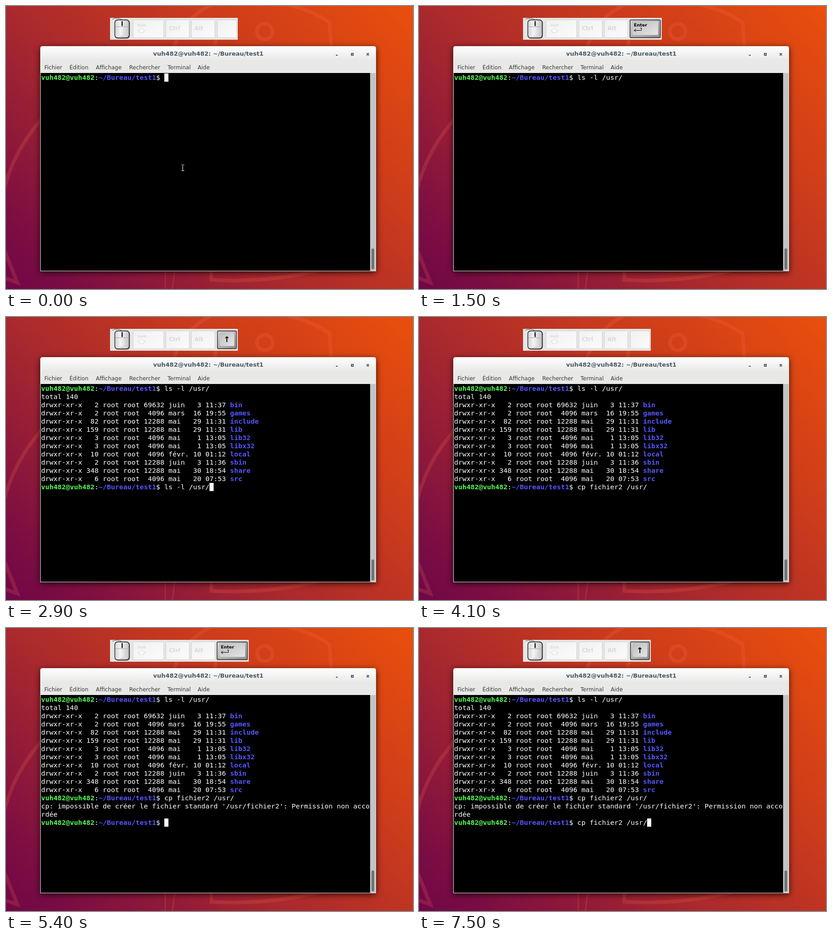
An HTML page that plays this animation: 892x621 px, repeating every 8 s.

```html
<!DOCTYPE html>
<html lang="fr">
<head>
<meta charset="utf-8">
<title>Terminal</title>
<style>
  html, body { margin: 0; width: 100%; height: 100%; overflow: hidden; background: #b5302a; }
  svg { display: block; width: 892px; height: 621px; }
  text { white-space: pre; }
  .window { filter: drop-shadow(0 3px 7px rgba(0, 0, 0, .75)); }
  .trace { fill: none; stroke: #ff6a50; stroke-opacity: .2; }
  .title { font: bold 13px "DejaVu Sans", sans-serif; fill: #455a64; text-anchor: middle; }
  .menu { font: 12px "DejaVu Sans", sans-serif; fill: #3a3a3a; }
  .term { font: 14.95px "DejaVu Sans Mono", monospace; fill: #fff; }
  .term .green { font-weight: bold; fill: #55ff55; }
  .term .blue { font-weight: bold; fill: #5555ff; }
  .label { font: bold 12px "DejaVu Sans", sans-serif; fill: #d9d9d9; }
  .idle { fill: url(#idle); stroke: #d2d2d2; }
  .pressed { font: bold 9.5px "DejaVu Sans", sans-serif; }
  .pressed .arrow { font-size: 17px; text-anchor: middle; }
</style>
</head>
<body>
<svg viewBox="0 0 892 621">
  <defs>
    <linearGradient id="wall" gradientUnits="userSpaceOnUse" x1="68" y1="689" x2="824" y2="-68">
      <stop offset="0" stop-color="#6f0747"/>
      <stop offset=".1" stop-color="#7b0d43"/>
      <stop offset=".41" stop-color="#a9292d"/>
      <stop offset=".7" stop-color="#cd3c1b"/>
      <stop offset="1" stop-color="#e94f0c"/>
    </linearGradient>
    <linearGradient id="bar" x2="0" y2="1">
      <stop offset="0" stop-color="#fefefe"/>
      <stop offset="1" stop-color="#e8e8e7"/>
    </linearGradient>
    <linearGradient id="idle" x2="1" y2="1">
      <stop offset="0" stop-color="#f1f1f1"/>
      <stop offset="1" stop-color="#fbfbfb"/>
    </linearGradient>
    <linearGradient id="rim" x2="1" y2="1">
      <stop offset="0" stop-color="#d6d6d6"/>
      <stop offset="1" stop-color="#8e8e8e"/>
    </linearGradient>
    <linearGradient id="cap" x2="1" y2="1">
      <stop offset="0" stop-color="#bcbcbc"/>
      <stop offset="1" stop-color="#e6e6e6"/>
    </linearGradient>
    <linearGradient id="shell" x2="1" y2="0">
      <stop offset="0" stop-color="#d2d2d4"/>
      <stop offset=".4" stop-color="#f4f4f5"/>
      <stop offset="1" stop-color="#c2c2c5"/>
    </linearGradient>
  </defs>

  <rect width="892" height="621" fill="url(#wall)"/>
  <g class="trace" stroke-width="8">
    <circle cx="567" cy="56" r="17"/>
    <path d="M367 92C385 45 410 15 455-5M457 92Q458 72 470 55M600-6Q665 5 709 36L713 92"/>
    <path d="M80 246Q18 315-4 402M-6 530L25 607L-5 596"/>
    <path d="M450 580V601Q570 608 685 580"/>
    <path d="M349 580V625M370 580L364 625" stroke-width="3"/>
  </g>

  <g class="window">
    <path d="M75 582V93Q75 88 80 88H806Q811 88 811 93V582Z" fill="#e8e8e7"/>
  </g>
  <path d="M76 120V93Q76 89 80 89H806Q810 89 810 93V120Z" fill="url(#bar)"/>
  <rect x="76" y="147" width="722" height="434"/>
  <rect x="798" y="147" width="12" height="434" fill="#c0c4c4"/>
  <rect x="801" y="532" width="6" height="46" rx="3" fill="#6b7576"/>
  <text class="title" x="443.5" y="109">vuh482@vuh482: ~/Bureau/test1</text>
  <g stroke="#455a64" stroke-width="2" fill="none">
    <path d="M723 108H727M757 104H761V108H757ZM790.5 103.5L795.500 108.500M795.500 103.500L790.500 108.500"/>
  </g>
  <g class="menu">
    <text x="84" y="139">Fichier</text>
    <text x="139" y="139">Édition</text>
    <text x="197" y="139">Affichage</text>
    <text x="270" y="139">Rechercher</text>
    <text x="354" y="139">Terminal</text>
    <text x="420" y="139">Aide</text>
  </g>

  <rect id="panel" x="228" y="26" width="280" height="48" fill="#e5e5e4"/>
  <rect x="239" y="31" width="32.500" height="40.500" rx="6" fill="#777"/>
  <rect x="238.500" y="30.500" width="31.500" height="39.500" rx="6" fill="url(#shell)" stroke="#111" stroke-width="1.300"/>
  <path d="M239 45.500H270M254.500 31V45" stroke="#aaa"/>
  <path d="M233 29Q245 24 254 30" fill="none" stroke="#555"/>
  <rect x="253" y="33" width="3" height="11" rx="1.500" fill="#333"/>
  <path d="M250 66.500H259" stroke="#b0b0b4"/>
  <g class="idle">
    <rect x="278.500" y="30.500" width="67" height="39" rx="2"/>
    <rect x="350.500" y="30.500" width="51" height="39" rx="2"/>
    <rect x="406.500" y="30.500" width="51" height="39" rx="2"/>
  </g>
  <g class="label">
    <text x="288" y="45" style="font-size:7px">Shift</text>
    <text x="357" y="53">Ctrl</text>
    <text x="413" y="53">Alt</text>
  </g>
  <path d="M297 48.500L305.500 54.500H301.500V58.500H292.500V54.500H288.500Z" fill="#fafafa" stroke="#dadada"/>
  <g id="key"></g>

  <g id="screen" class="term"></g>
  <path id="pointer" d="M384.500 348.500H386.500L387.500 349.500L388.500 348.500H390.500M387.500 349V361M384.500 361.500H390.500" fill="none" stroke="#fff"/>
</svg>

<script>
const LOOP = 8000, COLS = 80, CELL = 9, ROW = 18;
const byId = id => document.getElementById(id);

const LS = 'ls -l /usr/', CP = 'cp fichier2 /usr/', SUDO = 'sudo ' + CP;
const LISTING = [
  '2 69632 juin 3 11:37 bin', '2 4096 mars 16 19:55 games',
  '82 12288 mai 29 11:31 include', '159 12288 mai 29 11:31 lib',
  '3 4096 mai 1 13:05 lib32', '3 4096 mai 1 13:05 libx32',
  '10 4096 févr. 10 01:12 local', '2 12288 juin 3 11:36 sbin',
  '348 12288 mai 30 18:54 share', '6 4096 mai 20 07:53 src',
];
const ERROR = "cp: impossible de créer le fichier standard '/usr/fichier2': Permission non accordée";

// start time, pressed key, commands already run, typed text, cursor shown
const STATES = [
  [0, '', 0, '', true],
  [300, '↑', 0, '', true],
  [400, '↑', 0, LS, true],
  [1000, '', 0, LS, false],
  [1500, 'Enter', 0, LS, false],
  [1600, 'Enter', 1, '', true],
  [2100, '', 1, '', false],
  [2900, '↑', 1, LS, true],
  [3500, '↑', 1, CP, true],
  [4100, '', 1, CP, false],
  [4400, '↑', 1, SUDO, true],
  [4900, '↓', 1, CP, true],
  [5300, 'Enter', 1, CP, true],
  [5400, 'Enter', 2, '', true],
  [5900, '', 2, '', false],
  [6500, '↑', 2, CP, true],
  [6900, '↑', 2, LS, true],
  [7500, '↑', 2, CP, true],
];

// Words are placed on the character grid one by one.
function write(row, col, str, style = '') {
  return [...str.matchAll(/\S+/g)].map(word =>
    `<text class="${style}" x="${77 + (col + word.index) * CELL}" y="${162 + row * ROW}">${word[0]}</text>`
  ).join('');
}

const prompt = (row, command) =>
  write(row, 0, 'vuh482@vuh482', 'green') + write(row, 13, ':') +
  write(row, 14, '~/Bureau/test1', 'blue') + write(row, 28, '$ ' + command);

function listing(row) {
  return write(row, 0, 'total 140') + LISTING.map((entry, i) => {
    const [links, size, month, day, time, name] = entry.split(' ');
    const line = `drwxr-xr-x ${links.padStart(3)} root root ${size.padStart(5)} ` +
      `${month.padEnd(5)} ${day.padStart(2)} ${time}`;
    return write(row + 1 + i, 0, line) + write(row + 1 + i, 46, name, 'blue');
  }).join('');
}

function screen(done, typed, cursor) {
  let out = '', row = 0;
  if (done > 0) {
    out += prompt(0, LS) + listing(1);
    row = 12;
  }
  if (done > 1) {
    out += prompt(12, CP) + write(13, 0, ERROR.slice(0, COLS)) + write(14, 0, ERROR.slice(COLS));
    row = 15;
  }
  out += prompt(row, typed);
  if (cursor) {
    out += `<rect x="${77 + (30 + typed.length) * CELL}" y="${148 + row * ROW}" width="${CELL}" height="${ROW}"/>`;
  }
  return out;
}

function keyCap(key) {
  if (!key) return '<rect class="idle" x="463.5" y="30.5" width="42" height="39" rx="2"/>';
  const enter = key === 'Enter', x = enter ? 462.5 : 463.5, width = enter ? 66.5 : 41.5;
  const face = enter
    ? '<text x="471" y="45">Enter</text><path d="M487.5 48V53.500H472M475.500 50.500L471.500 53.500L475.500 56.500M484.500 48.500H487.500" fill="none" stroke="#000"/>'
    : `<text class="arrow" x="484" y="55">${key}</text>`;
  return `<g class="pressed">
    <rect x="${x}" y="30.500" width="${width}" height="39" rx="2" fill="url(#rim)" stroke="#222" stroke-width="1.400"/>
    <rect x="${x + 5}" y="33.500" width="${width - 10}" height="30" rx="2" fill="url(#cap)"/>${face}</g>`;
}

let shown;
function frame(now) {
  const time = now % LOOP;
  const state = STATES.findLast(s => s[0] <= time);
  if (state !== shown) {
    shown = state;
    const [start, key, done, typed, cursor] = state;
    byId('screen').innerHTML = screen(done, typed, cursor);
    byId('key').innerHTML = keyCap(key);
    byId('panel').setAttribute('width', key === 'Enter' ? 304 : 280);
    byId('pointer').style.display = start < 400 ? '' : 'none';
  }
  requestAnimationFrame(frame);
}
frame(0);
</script>
</body>
</html>
```
